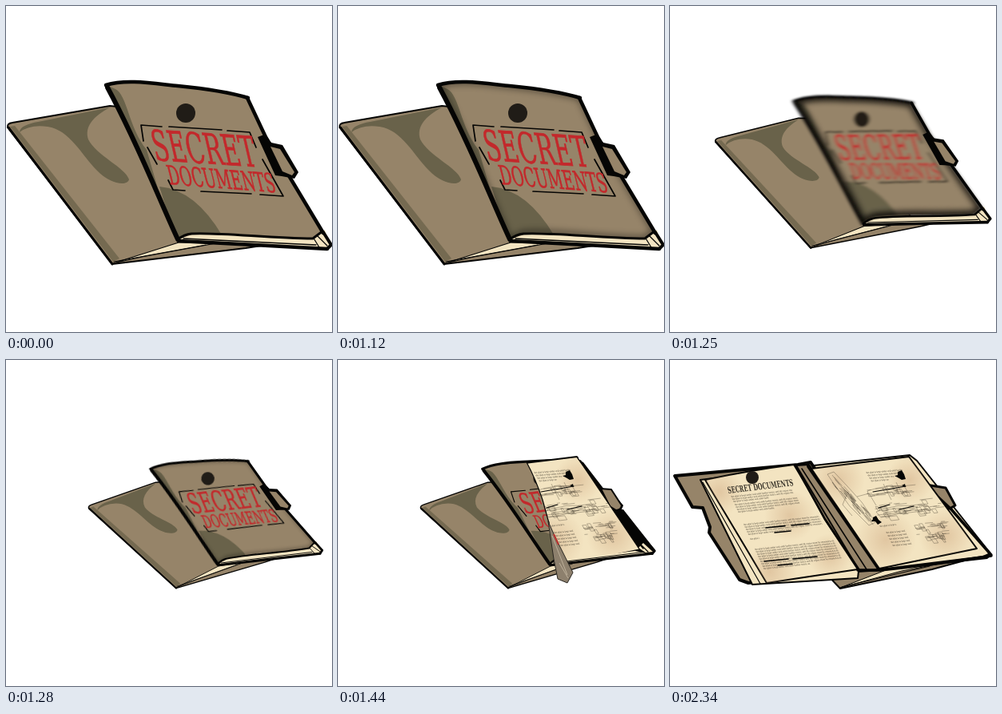
An HTML page that plays this animation: 408x408 px, repeating every 2.88 s.

```html
<!DOCTYPE html>
<html lang="en">
<head>
<meta charset="utf-8">
<title>Secret documents</title>
<style>
  html, body { margin: 0; width: 100%; height: 100%; overflow: hidden; background: #fff; }
  svg { display: block; width: 100%; height: 100%; stroke-width: 2; }
  .brown { fill: #968469; }
  .shade { fill: #69624a; }
  .cream { fill: #f3e4c1; }
  .ink { fill: #050504; }
  .line { fill: none; stroke: #050504; stroke-linejoin: round; stroke-linecap: round; }
  .edged { stroke: #050504; stroke-linejoin: round; }
  .stamp { fill: #c3282b; stroke: #c3282b; stroke-width: .7; font-family: "DejaVu Serif", serif; }
  .title { font: bold 13px "DejaVu Serif", serif; fill: #3a352b; }
  .note { font: 3px "Liberation Serif", serif; fill: #3d372c; }
  .sketch { fill: none; stroke: #463e32; stroke-width: .5; opacity: .75; }
</style>
</head>
<body>
<svg viewBox="0 0 408 408">
  <defs>
    <filter id="smear" x="-20%" y="-20%" width="140%" height="140%"><feGaussianBlur stdDeviation="2.4 1.6"/></filter>
    <filter id="soft" x="-20%" y="-20%" width="140%" height="140%"><feGaussianBlur stdDeviation=".5"/></filter>
    <filter id="glow" x="-20%" y="-20%" width="140%" height="140%"><feGaussianBlur stdDeviation="4"/></filter>
    <radialGradient id="stain">
      <stop stop-color="#cfa982" stop-opacity=".5"/><stop offset="1" stop-color="#cfa982" stop-opacity="0"/>
    </radialGradient>
    <path id="coverShape" d="M126 99C150 91 185 97 215 100S280 108 303 115L327 165L396 282L384 291C330 291 270 281 232 284Q222 288 215 293C195 250 165 170 126 99Z"/>
    <clipPath id="coverClip"><use href="#coverShape"/></clipPath>
    <clipPath id="turned"><path d="M236 128Q247 148 256 175L264 204L273 252L378 238L301 124V110H236Z"/></clipPath>
    <clipPath id="leftClip"><path d="M44 150Q100 138 155 131Q168 152 194 200L235 262L121 279Z"/></clipPath>
    <clipPath id="rightClip"><path d="M177 136L299 121L384 236L262 261Z"/></clipPath>
  </defs>

  <g id="closed">
    <path class="brown edged" d="M133 323L2 152Q1 147 8 146L130 125L180 130L290 290L345 296L300 303Z"/>
    <path fill="#756a51" d="M5 151L11 150L142 316L134 320Z"/>
    <path class="shade" d="M17 158C17 151 28 147 40 145L130 127C109 138 98 151 103 167C113 187 149 202 154 217C152 226 130 223 114 206C95 187 80 155 52 151Q30 148 17 158Z"/>
    <path class="cream edged" stroke-width="1.2" d="M134 322L216 296L268 296L170 314Z"/>
    <path class="line" stroke-width="1" d="M135 320L250 299"/>
    <path class="line" stroke-width="3" d="M3 152L133 323"/>
    <path class="cream" d="M215 292L236 285L384 291L399 280L406 299L402 305L219 295Z"/>
    <path class="line" stroke-width="1.3" d="M222 291L388 299M384 289L392 302M388 286L402 300"/>
    <path class="line" stroke-width="4.5" d="M216 294C270 297 350 301 402 304"/>
    <path class="line" stroke-width="4" d="M397 283L407 299L402 304"/>

    <g id="cover">
      <use href="#coverShape" class="brown"/>
      <g clip-path="url(#coverClip)">
        <path class="shade" d="M126 99L137 104C152 112 153 151 176 180L190 228Z"/>
        <path class="shade" d="M192 226Q237 230 271 288L214 297Z"/>
        <use id="bevel" href="#coverShape" class="line" filter="url(#glow)"/>
      </g>
      <circle cx="225" cy="134" r="12" fill="#201c17"/>
      <path class="line" stroke-width="1.7" d="M172 169L169 149L195 151M204 151L270 155M277 156L305 158L313 177M321 192L347 238L318 236M307 235L244 232M224 231L209 230L203 218M189 198L177 177"/>
      <text class="stamp" font-size="53" transform="matrix(.565 .037 .23 1 187 193)">SECRET</text>
      <text class="stamp" font-size="33" transform="matrix(.565 .044 .25 1 205 223)">DOCUMENTS</text>
      <path class="line" stroke-width="4.5" d="M125 99C150 91 185 97 215 100S280 108 303 115"/>
      <path class="line" stroke-width="6" d="M127 102C165 172 193 245 215 292"/>
    </g>
    <path class="line" stroke-width="3" d="M215 292Q223 286 232 285C270 283 330 291 384 291L396 282"/>
    <path class="line" stroke-width="4.5" d="M302 115L325 164L397 284"/>
    <path class="ink" d="M315 164L323 161L332 171L346 174L366 208L361 216L345 213L337 212Z"/>
    <path class="brown" d="M331 176L343 179L361 208L358 212L346 207Z"/>
  </g>

  <g id="edge">
    <path class="ink" d="M299 124L307 128L334 163L346 187L357 187L398 239L394 244L372 239Z"/>
    <path class="cream" d="M291 126L299 126L317 156L312 155ZM316 157L321 158L341 187L335 187ZM376 235L382 229L394 240L385 241Z"/>
    <path class="line" stroke-width="1.3" d="M297 126L318 158L382 236M379 231L388 240"/>
    <path class="brown edged" d="M329 161L342 162L355 182Q354 188 348 188L340 183Z"/>
  </g>

  <g id="open">
    <path class="brown edged" d="M196 268L213 286L328 262L376 249L250 255Z"/>
    <path class="cream edged" stroke-width="1" d="M213 285L270 263L375 248L290 264Z"/>
    <path class="line" stroke-width="1" d="M215 284L325 258"/>
    <path class="brown edged" stroke-width="4" d="M6 145L160 131L176 128L264 262L235 264L98 279L87 275L49 216L50 209L41 185L28 184Z"/>
    <path class="cream edged" d="M38 150L150 136L236 264L235 273L103 281Z"/>
    <path class="line" stroke-width="1.2" d="M41 153L113 280"/>
    <path class="cream edged" d="M44 150Q100 138 155 131Q168 152 194 200L235 262L121 279Z"/>
    <g id="letter" clip-path="url(#leftClip)"></g>
    <path class="brown edged" d="M158 132L174 131L263 262L237 264Z"/>
    <path class="line" stroke-width="4" d="M173 133L261 261"/>
    <path class="line" stroke-width="2.5" d="M157 132L194 199L237 263"/>
    <path class="line" stroke-width="1.5" d="M165 136L246 262"/>
    <path class="ink" d="M296 119L307 124L334 158L351 184L403 244L397 249L262 264Z"/>
    <path class="cream edged" d="M180 132L300 119L309 126L401 242L392 246L263 262Z"/>
    <path class="brown edged" stroke-width="3" d="M320 156L345 160L357 182L350 186L339 183Z"/>
    <path class="line" stroke-width="3.5" d="M235 263L263 263Q340 255 402 245M319 156L352 187L402 244"/>
  </g>

  <g id="sheet">
    <path class="cream edged" d="M177 136L299 121L384 236L262 261Z"/>
    <g id="plans" clip-path="url(#rightClip)"></g>
  </g>

  <g id="flap">
    <path class="line" stroke-width="1.2" d="M236 128Q247 148 256 175L264 204L273 252M301 124L378 238"/>
    <path fill="#8d806d" stroke="#292620" stroke-width="1" d="M263 202L272 222L294 266L287 279L275 274L270 249Z"/>
    <path fill="none" stroke="#bdb09a" stroke-width="1" d="M268 220L287 269M277 254L288 273"/>
    <path fill="none" stroke="#b8302f" d="M270 218L276 231"/>
  </g>
</svg>
<script>
const $ = id => document.getElementById(id);

let seed = 7;
const rnd = () => (seed = seed * 16807 % 2147483647) / 2147483647;
const span = (a, b) => a + (b - a) * rnd();

const stain = (x, y, r) => `<circle cx="${x}" cy="${y}" r="${r}" fill="url(#stain)"/>`;
const words = "the plan is kept under seal until further notice and all copies must be returned to the office ".repeat(2);
const row = (x, y, length, slope = -.11) =>
  `<text class="note" transform="matrix(1 ${slope} .5 1 ${x} ${y})">${words.slice(0, length)}</text>`;
const bar = (x, y, w) => `<path class="line" stroke-width="1.6" d="M${x} ${y}l${w} ${-w * .1}"/>`;

// Loose technical scribble inside a slanted box
function sketch(x, y, w, h, slope, count) {
  let d = "";
  for (let i = 0; i < count; i++) {
    const u = span(0, w), v = span(-h / 2, h / 2), l = span(4, w / 3);
    const px = x + u, py = y + v + u * slope;
    d += i % 3 ? `M${px} ${py}l${l} ${l * slope}` : `M${px} ${py}l3 5l${l / 2} ${l / 2 * slope}l-3 -5z`;
  }
  return `<path class="sketch" d="${d}"/>`;
}

function buildLetter() {
  let out = stain(62, 165, 30) + stain(150, 195, 32) + stain(125, 265, 34) + stain(200, 245, 28);
  out += `<circle cx="103" cy="147" r="8" fill="#201c17"/>`;
  out += `<text class="title" transform="matrix(.5 -.06 .2 .85 73 167)">SECRET DOCUMENTS</text>`;
  for (const [top, count, length] of [[172, 3, 66], [182, 4, 68], [207, 5, 82], [225, 1, 18], [238, 9, 86]])
    for (let i = 0; i < count; i++) {
      const y = top + i * 3;
      out += row(77 + (y - 172) * .45, y, i == count - 1 ? length * .6 : length);
    }
  for (const [x, y, w] of [[120, 210, 24], [152, 207, 22], [131, 216, 20], [118, 252, 30], [154, 249, 30], [135, 257, 18]])
    out += bar(x, y, w);
  return out;
}

function buildPlans() {
  let out = stain(210, 150, 34) + stain(300, 150, 30) + stain(270, 225, 38) + stain(345, 220, 34);
  out += `<path class="sketch" d="M197 143l8 -3l17 18l18 20l17 25l-8 4l-24 -24l-18 -25zM203 144l46 58M221 169l-5 12l12 14M234 171l15 -4l9 15"/>`;
  out += `<path class="sketch" d="M247 164q22 -8 46 -6l4 6q-26 1 -48 7zM258 190q30 -12 52 -6q-20 9 -46 13zM267 155l10 20M283 153l8 16"/>`;
  out += sketch(203, 147, 44, 14, 1.1, 30) + sketch(246, 166, 50, 12, -.1, 22) +
    sketch(255, 190, 60, 17, -.12, 34) + sketch(303, 185, 33, 10, -.12, 12) + sketch(304, 216, 38, 22, -.08, 40);
  for (let i = 0; i < 4; i++) out += row(246 + i * 2, 142 + i * 3.4, 40 - i * 7, -.08);
  for (let i = 0; i < 5; i++) out += row(271 + i * 2, 217 + i * 4, 20, -.1);
  out += row(263, 209, 18, -.12);
  out += `<path class="line" stroke-width="1.1" d="M254 165l41 -7M261 185l14 -4M287 187l18 -4"/>`;
  out += `<path class="ink" d="M285 140l5 -2l3 5l2 6l-5 1l-5 -3l-4 -2l4 -1zM254 197l4 -2l3 5l4 3l-5 3l-3 -4l-5 0l2 -3zM290 157l4 -2l1 4z"/>`;
  return out;
}

$("letter").innerHTML = buildLetter();
$("plans").innerHTML = buildPlans();

const loop = 2880;
// start, how far the folder has tilted, cover filter, bevel width, bevel opacity
const poses = [
  [0, 0, "", 0, 0],
  [1120, 0, "", 6, .5],
  [1200, .54, "url(#smear)", 15, .75],
  [1280, 1, "url(#soft)", 5, .4],
  [1360, 1, "", 0, 0],
  [1440, 1, "", 0, 0],
  [1520, 1, "", 0, 0]
];
const tilted = [.678, -.114, .12, .67, 84, 84.3];
const flat = [1, 0, 0, 1, 0, 0];

const show = (id, on) => $(id).setAttribute("display", on ? "inline" : "none");

function draw(now) {
  const time = now % loop;
  const [start, tilt, filter, width, opacity] = poses.findLast(pose => pose[0] <= time);
  const turning = start === 1440, opened = start === 1520;
  $("closed").setAttribute("transform", `matrix(${flat.map((v, i) => v + (tilted[i] - v) * tilt)})`);
  $("cover").setAttribute("filter", filter || "none");
  $("bevel").setAttribute("stroke-width", width);
  $("bevel").setAttribute("opacity", opacity);
  $("sheet").setAttribute("clip-path", turning ? "url(#turned)" : "none");
  show("closed", !opened);
  show("edge", start === 1360 || turning);
  show("open", opened);
  show("sheet", turning || opened);
  show("flap", turning);
}

const origin = performance.now();
function tick() {
  draw(performance.now() - origin);
  requestAnimationFrame(tick);
}
tick();
</script>
</body>
</html>
```
